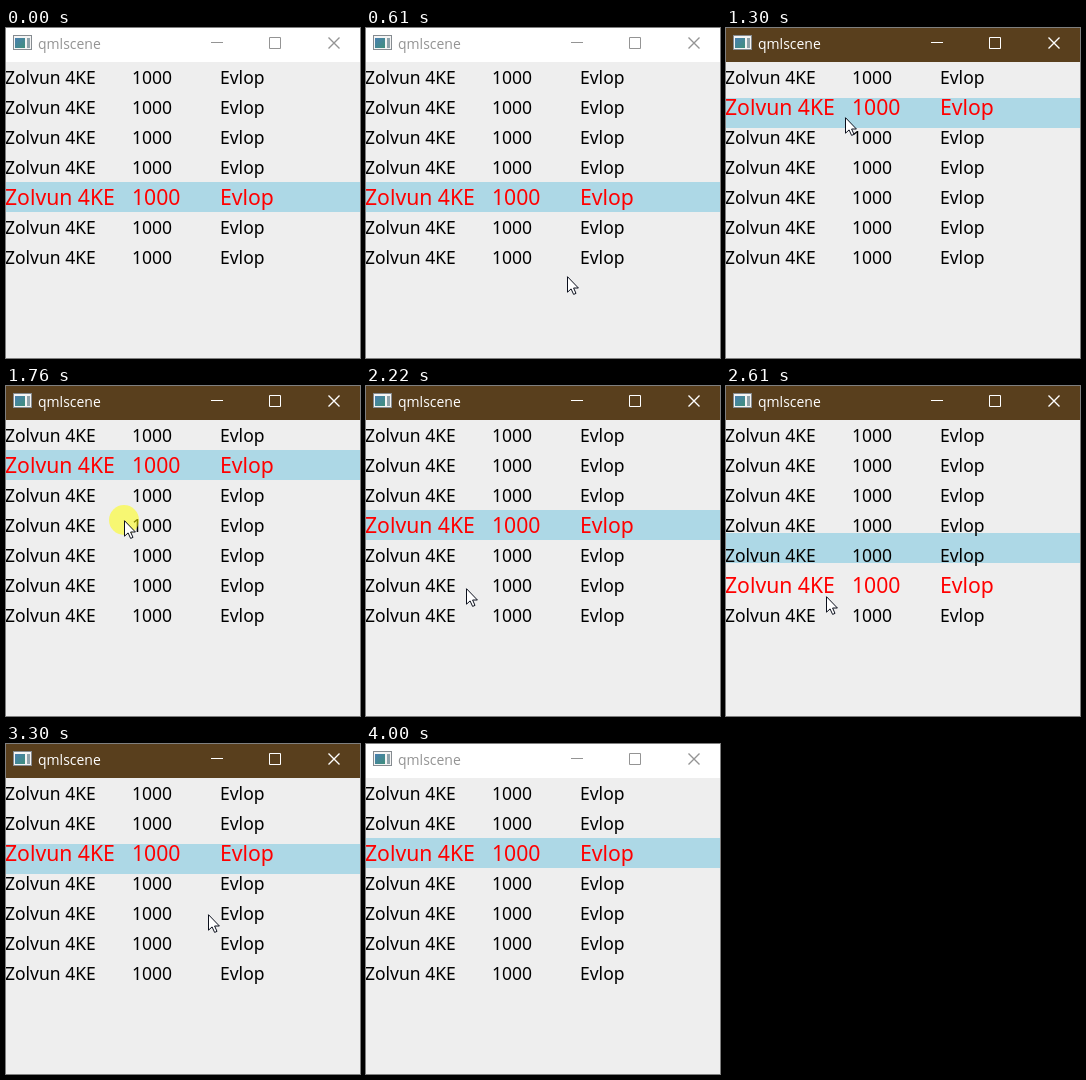
These frames come from a looping animation (354 by 330 pixels, 4150 ms). An HTML page:

```html
<!DOCTYPE html>
<html lang="en">
<head>
<meta charset="utf-8">
<title>qmlscene</title>
<style>
  html, body { margin: 0; width: 100%; height: 100%; overflow: hidden; background: #eee; }
  svg { display: block; width: 354px; height: 330px; }
  .row { font: 17.5px "Noto Sans", "Open Sans", sans-serif; fill: #000; }
  .row.current { font-size: 21.2px; fill: #f00; }
  #bar { color: #949494; }
  #bar .back { fill: #fff; }
  #bar.active { color: #fff; }
  #bar.active .back { fill: #593f1d; }
  #bar text { font: 14px "Open Sans", "Noto Sans", sans-serif; fill: currentColor; }
  #bar .buttons { fill: none; stroke: currentColor; }
</style>
</head>
<body>
<svg viewBox="0 0 354 330">
  <defs>
    <linearGradient id="pane" x2="1" y2="1">
      <stop stop-color="#4a7fb0"/>
      <stop offset="1" stop-color="#3f8f7c"/>
    </linearGradient>
  </defs>
  <rect width="354" height="330" fill="#eee"/>
  <rect id="highlight" width="354" height="30" fill="#add8e6"/>
  <g id="list"></g>
  <g id="bar">
    <rect class="back" width="354" height="34"/>
    <rect x="7.5" y="7.5" width="18" height="14" fill="#f4f4f4" stroke="#858b90"/>
    <rect x="9" y="10" width="10" height="10" fill="url(#pane)"/>
    <rect x="21" y="10" width="3" height="10" fill="#8fa3ab"/>
    <text x="32" y="21">qmlscene</text>
    <g class="buttons">
      <path d="M205 14.5h12M263.5 9.5h11v11h-11z"/>
      <path d="M322.5 9.5l11 11m0-11l-11 11" stroke-width="1.35"/>
    </g>
  </g>
  <circle id="press" r="15" fill="#ff0" fill-opacity=".52"/>
  <path id="cursor" d="M.5.7V16.2L4.1 12.9 6.6 18.4 9 17.4 6.6 12H11.4Z" fill="#fff" stroke="#0b0f1c"/>
</svg>
<script>
const LOOP = 4150, START = 456, TICK = 230 / 3;   // ms
const TOP = 34, ROW = 30, FIRST_ROW = 4;
const GLIDE = 208 / TICK;
const columns = { "Zolvun 4KE": -1, "1000": 126, "Evlop": 214 };

// cursor stops, times in ticks; a stop with a press is a click on the row below it
const entry = { x: 230, y: 303 };
const stops = [
  { x: 119, y: 89, leave: 0, arrive: 6, press: 8, release: 8.8 },
  { x: 118, y: 134, leave: 13, arrive: 16, press: 16, release: 17.2 },
  { x: 100, y: 202, leave: 18.4, arrive: 23 },
  { x: 100, y: 210, leave: 23, arrive: 25, press: 26, release: 26.8 },
  { x: 158, y: 106, leave: 29, arrive: 33, press: 34, release: 34.8 },
  { x: 304, y: 317, leave: 34.7, arrive: 41 }
];
const clicks = stops.filter(s => s.press);
const leaveTick = 42;

const clamp = u => Math.min(Math.max(u, 0), 1);
const mix = (a, b, u) => a + (b - a) * u;
const smooth = u => u * u * (3 - 2 * u);
const quad = u => u < .5 ? 2 * u * u : 1 - 2 * (1 - u) ** 2;

const $ = id => document.getElementById(id);
const bar = $("bar"), highlight = $("highlight"), press = $("press"), cursor = $("cursor");

const rows = Array.from({ length: 7 }, () => {
  const g = document.createElementNS("http://www.w3.org/2000/svg", "g");
  for (const [label, x] of Object.entries(columns)) {
    const text = document.createElementNS(g.namespaceURI, "text");
    text.setAttribute("x", x);
    text.textContent = label;
    g.append(text);
  }
  $("list").append(g);
  return g;
});

function place(el, x, y) {
  el.setAttribute("transform", `translate(${x} ${y})`);
}

function show(el, on) {
  el.style.display = on ? "" : "none";
}

function drawList(tick) {
  let current = FIRST_ROW, pos = FIRST_ROW;
  for (const { y, release } of clicks) {
    if (tick < release) break;
    const from = current;
    current = Math.floor((y - TOP) / ROW);
    pos = mix(from, current, quad(clamp((tick - release) / GLIDE)));
  }
  highlight.setAttribute("y", Math.floor(TOP + pos * ROW));
  rows.forEach((row, i) => {
    const on = i === current;
    row.setAttribute("class", on ? "row current" : "row");
    place(row, 0, TOP + i * ROW + (on ? 23 : 22));
  });
}

function drawPointer(tick) {
  let { x, y } = entry;
  for (const s of stops) {
    const u = smooth(clamp((tick - s.leave) / (s.arrive - s.leave)));
    x = mix(x, s.x, u);
    y = mix(y, s.y, u);
  }
  for (const el of [cursor, press]) place(el, Math.round(x), Math.round(y));
  show(cursor, tick >= 0 && tick < leaveTick);
  show(press, clicks.some(c => tick >= c.press && tick < c.release));
}

function draw(time) {
  const tick = Math.floor((time - START) / TICK);   // the picture refreshes once per tick
  drawList(tick);
  drawPointer(tick);
  bar.setAttribute("class", tick >= clicks[0].press && time < 4000 ? "active" : "");
}

const origin = performance.now();
function frame() {
  draw((performance.now() - origin) % LOOP);
  requestAnimationFrame(frame);
}
frame();
</script>
</body>
</html>
```
